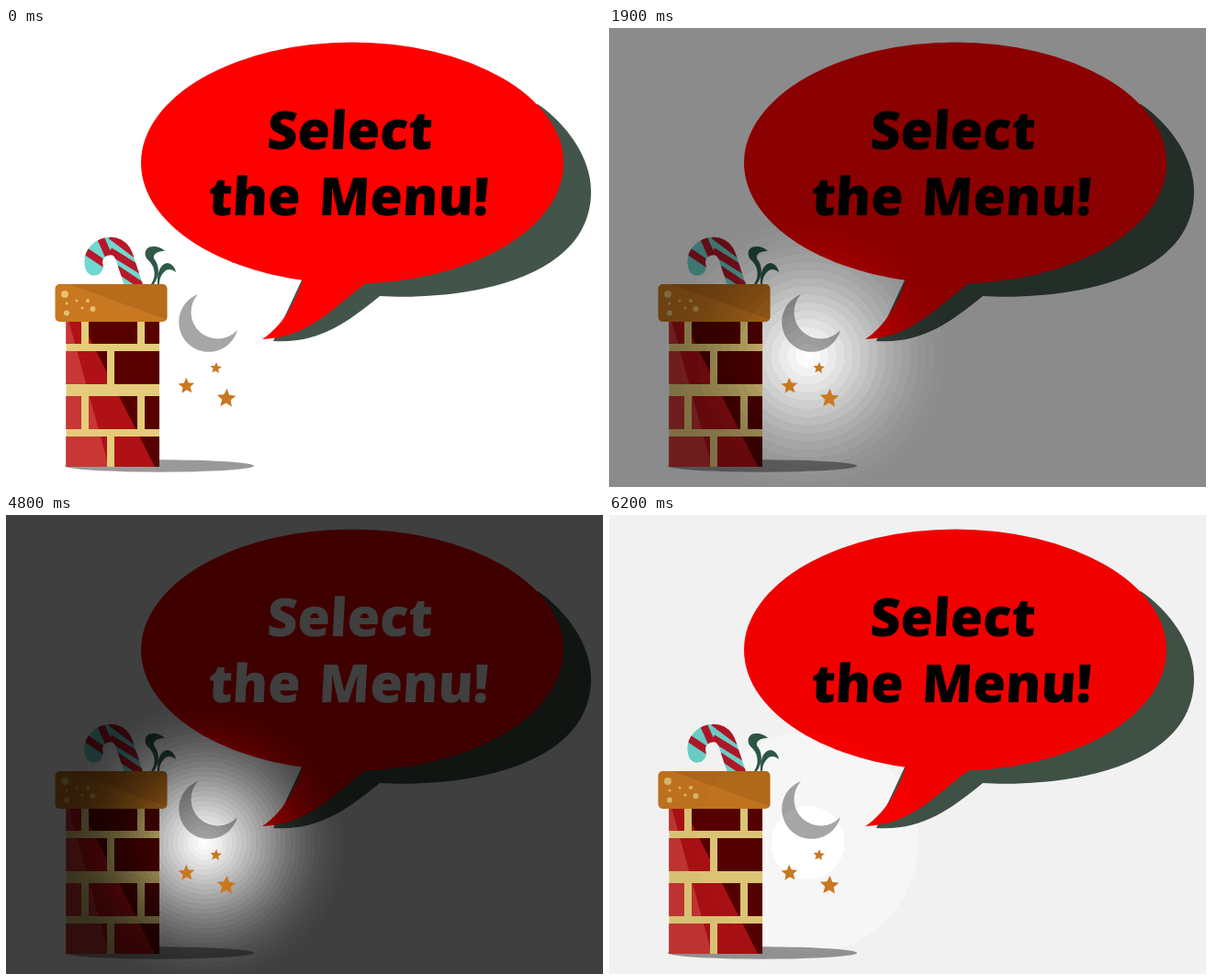
Animation of 650x500 px, one loop 6300 ms. Source, as an HTML page:

```html
<!DOCTYPE html>
<html lang="en">
<head>
<meta charset="utf-8">
<title>Select the Menu</title>
<style>
html, body { margin: 0; width: 100%; height: 100%; overflow: hidden; background: #fff; }
svg { display: block; width: 650px; height: 500px; }
text { font: 800 57.500px "Open Sans", sans-serif; text-anchor: middle; word-spacing: 5px; }
</style>
</head>
<body>
<svg viewBox="0 0 650 500">
  <defs>
    <radialGradient id="lampGrad" gradientUnits="userSpaceOnUse" cx="216.5" cy="357" r="160"></radialGradient>
    <radialGradient id="spotGrad" gradientUnits="userSpaceOnUse" cx="378" cy="147" r="300"></radialGradient>
    <mask id="shade" maskUnits="userSpaceOnUse" x="0" y="0" width="650" height="500">
      <rect width="650" height="500" fill="#fff"/>
      <rect width="650" height="500" fill="url(#lampGrad)"/>
      <rect id="spot" width="650" height="500" fill="url(#spotGrad)"/>
    </mask>
    <mask id="caneMask" maskUnits="userSpaceOnUse" x="80" y="220" width="80" height="60">
      <path d="M96 260C92 246 104 237.500 114 237.500C126 237.500 129 249 131 256L140 283" fill="none" stroke="#fff" stroke-width="19.500" stroke-linecap="round"/>
    </mask>
    <clipPath id="brickClip"><path id="brickShape"/></clipPath>
    <clipPath id="capClip"><rect x="53.500" y="279" width="122" height="41" rx="5"/></clipPath>
  </defs>

  <rect width="650" height="500" fill="#fff"/>

  <path fill="#43554a" d="M291 341C340 344 370 322 407 292C485 297 637 280 637 178C637 141 610 104 579 83L380 150Z"/>
  <g fill="#f00">
    <ellipse cx="377" cy="147" rx="230" ry="131.500"/>
    <path d="M324 268L322 277C314 302 299 326 279 339C330 337 355 305 392 278V265Z"/>
  </g>
  <g id="words">
    <text transform="translate(373.500 132) skewX(-3)">Select</text>
    <text transform="translate(372 204) skewX(-3)">the Menu!</text>
  </g>

  <ellipse cx="167" cy="477" rx="103" ry="6.700" fill="#999"/>

  <g mask="url(#caneMask)">
    <rect x="80" y="220" width="80" height="60" fill="#70d8d0"/>
    <path stroke="#b8182a" stroke-width="8" d="M82 240L109 258M100 222L113 251M114 226L146 250M113 243L152 267M120 262L156 286"/>
  </g>
  <path fill="#2f5a48" d="M158 279C165 268 161 258 154 252C149 246 152 238 160 238C166 238 170 240 173 243C165 243 160 246 161 251C168 260 167 270 161 279ZM165 279C164 266 169 256 176 256C181 257 184 261 185 266C180 262 175 262 172 266C168 270 167 275 167 279Z"/>

  <rect x="65.500" y="318" width="101.500" height="160" fill="#e4cc7a"/>
  <g clip-path="url(#brickClip)">
    <rect x="65" y="318" width="103" height="160" fill="#b01116"/>
    <path fill="#c83636" d="M65 318H68L112 478H65Z"/>
    <path fill="#580000" d="M81 318H168V478H162Z"/>
  </g>

  <g clip-path="url(#capClip)">
    <rect x="53" y="279" width="123" height="41" fill="#c87820"/>
    <path fill="#5a2800" fill-opacity=".15" d="M68 279H176V318Z"/>
    <g fill="#e4c070">
      <circle cx="64" cy="290" r="4"/><circle cx="66" cy="310.500" r="3"/>
      <circle cx="94.500" cy="306" r="3"/><circle cx="89" cy="297" r="2"/>
      <circle cx="77" cy="297" r="1.500"/><circle cx="83" cy="305" r="1.500"/>
      <circle cx="66" cy="300" r="1.500"/>
    </g>
  </g>

  <path fill="#a6a6a6" d="M209 290A32.500 32.500 0 1 0 252 329A29 29 0 0 1 209 290Z"/>

  <rect id="dark" width="650" height="500" mask="url(#shade)"/>
  <path id="stars" fill="#c87820"/>
</svg>
<script>
const $ = id => document.getElementById(id);
const LOOP = 6300, TICK = 100;

// Running bond: joints alternate between two layouts.
function bricks() {
  const rows = [[318, 344], [352, 388], [401, 437], [445, 478]];
  const layouts = [[[65.5, 82], [90, 143], [151, 167]], [[65.5, 110], [118, 167]]];
  return rows.map(([top, bottom], i) =>
    layouts[i % 2].map(([l, r]) => `M${l} ${top}H${r}V${bottom}H${l}Z`).join("")).join("");
}

function star(x, y, r, turn) {
  let d = "";
  for (let i = 0; i < 10; i++) {
    const a = turn + i * Math.PI / 5, q = i % 2 ? r * 0.46 : r;
    d += `${i ? "L" : "M"}${x + q * Math.sin(a)} ${y - q * Math.cos(a)}`;
  }
  return d + "Z";
}

// Stepped rings of light; dim(x) is 0 in full light and 1 in full shade.
function setRings(grad, count, dim) {
  let stops = "";
  for (let i = 0; i <= count; i++) {
    const from = Math.max(0, (i - 0.5) / count), to = Math.min(1, (i + 0.5) / count);
    const light = 1 - dim(i / count);
    for (const at of [from, to])
      stops += `<stop offset="${at}" stop-color="#000" stop-opacity="${light}"/>`;
  }
  grad.innerHTML = stops;
}

const lampDim = x => Math.sin(x * Math.PI / 2) ** 1.25;

function spotDim(x) {
  const u = Math.max(0, (x - 0.1) / 0.9);
  return u * u * (3 - 2 * u);
}

// Darkness in steps of 5 %, with one tick of rest on the way down.
function darkStep(t) {
  if (t < 1000) return 0;
  if (t < 1900) return Math.min(8, 1 + Math.floor((t - 1000) / TICK));
  if (t < 4800) return Math.min(15, 9 + Math.floor((t - 1900) / TICK));
  return 15 - Math.floor((t - 4800) / TICK);
}

let lastStep = -1;

function draw(t) {
  const step = darkStep(t);
  const lit = t >= 2800 && t < 4800;
  const white = t >= 2800 && t < 4900;
  if (step !== lastStep) {
    if (step) setRings($("lampGrad"), step * 2, lampDim);
    lastStep = step;
  }
  $("dark").setAttribute("opacity", lit ? 0.78 : step * 0.05);
  $("spot").setAttribute("opacity", lit ? 1 : 0);
  $("words").setAttribute("fill", white ? "#fff" : "#000");
}

function loop() {
  draw(performance.now() % LOOP);
  requestAnimationFrame(loop);
}

$("brickShape").setAttribute("d", bricks());
$("stars").setAttribute("d",
  star(228.5, 370.5, 6.5, 0.1) + star(196.5, 390, 9.3, -0.05) + star(240, 403.5, 10.8, 0.05));
setRings($("spotGrad"), 28, spotDim);
loop();
</script>
</body>
</html>
```
